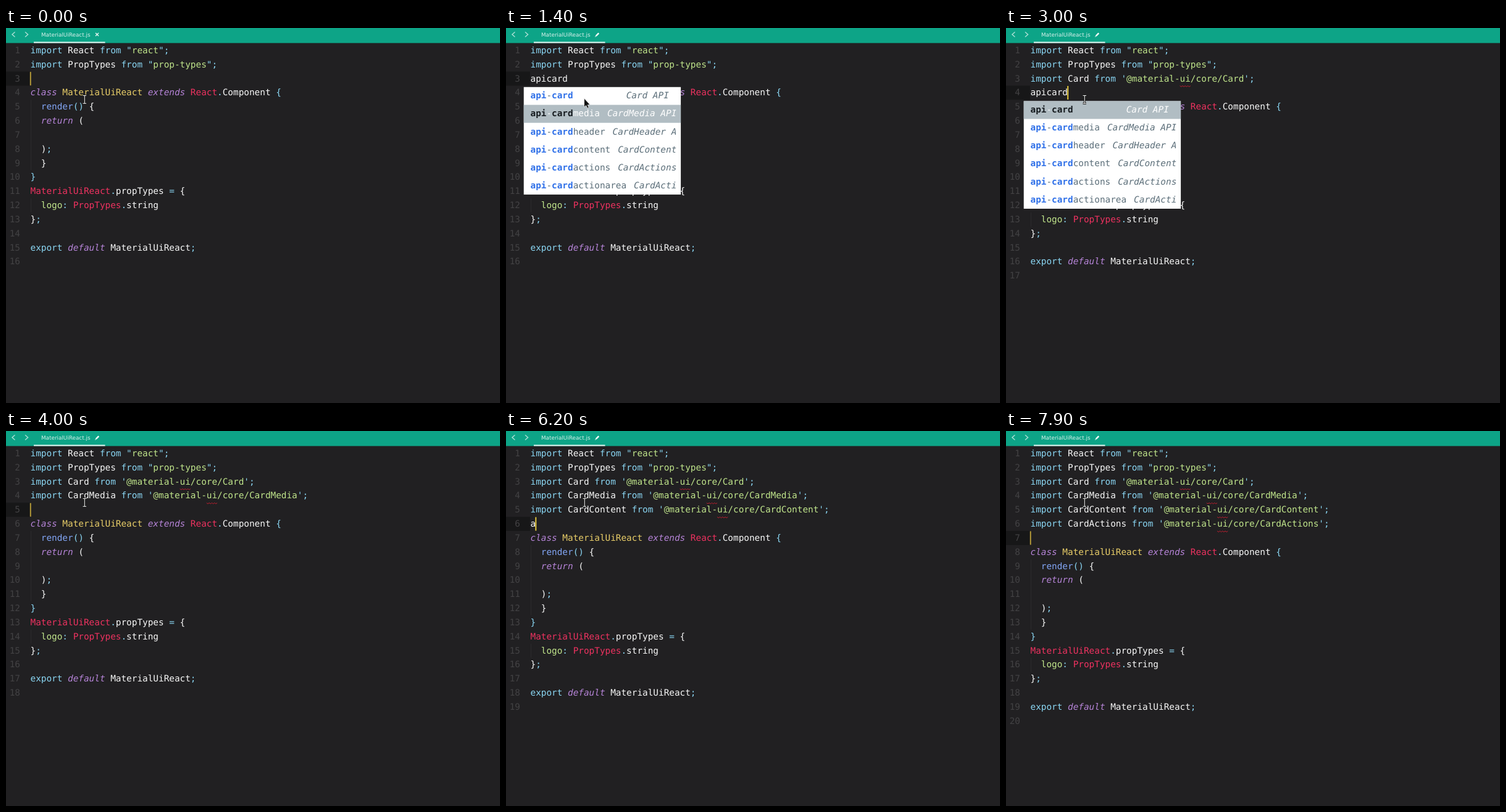
An HTML page with a canvas that plays this animation: 800x608 px, repeating every 8000 ms.

```html
<!DOCTYPE html>
<html lang="en">
<head>
<meta charset="utf-8">
<title>Editor autocomplete</title>
<style>
html, body { margin: 0; width: 100%; height: 100%; overflow: hidden; background: #212022; }
canvas { display: block; }
</style>
</head>
<body>
<canvas id="stage" width="800" height="608"></canvas>
<script>
const ctx = document.getElementById('stage').getContext('2d');
const LOOP = 8000, LEFT = 39.5, PITCH = 22.83, ROW = 29.12, SIZE = 14.37;
const MONO = `${SIZE}px "DejaVu Sans Mono", monospace`;
ctx.textRendering = 'geometricPrecision';
ctx.font = MONO;
const CHAR = ctx.measureText('m').width;

// Each segment starts with its style letter; segments are parted by |
const COLORS = { c: '#8ad6f3', w: '#f8f8f8', g: '#c0e58b', p: '#b684d8', y: '#e8cd68', r: '#ee3260', b: '#82a5f5' };
const HEAD = ['cimport |wReact |cfrom "|greact|c";', 'cimport |wPropTypes |cfrom "|gprop-types|c";'];
const TAIL = [
  'pclass |yMaterialUiReact |pextends |rReact|c.|wComponent |c{',
  'w  |brender|c() |w{', 'w  |preturn |w(', 'w', 'w  )|c;', 'w  }', 'c}',
  'rMaterialUiReact|c.|wpropTypes |c= |w{',
  'w  |glogo|c: |rPropTypes|c.|wstring', 'w}|c;', 'w',
  'cexport |pdefault |wMaterialUiReact|c;', 'w'
];
const importLine = name => `cimport |w${name} |cfrom '|g@material-ui/core/${name}|c';`;

// keys: times of the letters of QUERY; picks: [time, selected row, scroll in rows]
const QUERY = 'apicard';
const STEPS = [
  { name: 'Card', keys: [300, 400, 500, 600, 700, 800, 950], picks: [[1200, 1, 0], [1500, 0, 0]], insert: 1600, enter: 1800 },
  { name: 'CardMedia', keys: [2000, 2400, 2500, 2600, 2700, 2800, 2900], picks: [[2100, 20, 14.4], [2400, 0, 0], [3300, 1, 0]], insert: 3700, enter: 3900 },
  { name: 'CardContent', keys: [4100, 4200, 4300, 4400, 4500, 4700, 4800], picks: [[4500, 1, 1], [4700, 1, 0], [5000, 2, 0], [5200, 3, 0]], insert: 5500, enter: 5800 },
  { name: 'CardActions', keys: [6200, 6300, 6400, 6500, 6600, 6700, 6800], picks: [[6900, 1, 0], [7000, 2, 0], [7100, 4, 0]], insert: 7200, enter: 7700 }
];

const ITEMS = ('Card Chip Fade Grid Grow Icon Link List Menu Step Tabs Zoom Badge Modal Input Table Slide Radio ' +
  'Portal Switch Slider Select Avatar Collapse Container CardMedia CardHeader CardContent CardActions CssBaseline ' +
  'CardActionArea CircularProgress ClickAwayListener').split(' ');
const TOTALS = [0, 89, 89, 89, 45, 27];

// Positions of the query letters in the label, or null if they do not all occur
function match(label, query) {
  const hits = [];
  let from = 0;
  for (const ch of query) {
    const at = label.indexOf(ch, from);
    if (at < 0) return null;
    hits.push(at);
    from = at + 1;
  }
  return hits;
}

function suggestions(query) {
  const rest = query.slice(3);
  const rank = row => rest && row.label.startsWith('api-' + rest) ? 0 : 1;
  return ITEMS
    .map(name => ({ name, label: 'api-' + name.toLowerCase() }))
    .map(row => ({ ...row, hits: match(row.label, query) }))
    .filter(row => row.hits)
    .sort((a, b) => rank(a) - rank(b));
}

function text(str, x, y, color, style = '') {
  ctx.font = `${style} ${MONO}`;
  ctx.fillStyle = color;
  ctx.fillText(str, x, y);
}

function rect(x, y, w, h, color) {
  ctx.fillStyle = color;
  ctx.fillRect(x, y, w, h);
}

function path(points, color, width, close) {
  ctx.beginPath();
  points.forEach(([x, y]) => ctx.lineTo(x, y));
  if (close) ctx.closePath();
  ctx.strokeStyle = color;
  ctx.lineWidth = width;
  ctx.stroke();
}

const baseline = n => 41 + PITCH * (n - 1);
const plain = line => line.split('|').map(s => s.slice(1)).join('');

function drawHeader(modified) {
  rect(0, 0, 800, 24.4, '#0da487');
  path([[14.5, 6.5], [10, 10.5], [14.5, 14.5]], '#a9ded3', 1.5);
  path([[31, 6.5], [35.5, 10.5], [31, 14.5]], '#a9ded3', 1.5);
  ctx.font = '8.83px "DejaVu Sans", sans-serif';
  ctx.fillStyle = '#d8f1ec';
  ctx.fillText('MaterialUiReact.js', 57, 13.7);
  rect(45, 22.4, 115.5, 2, '#e6f5f2');
  if (modified) {
    path([[145.6, 13], [150.2, 8.4]], '#fff', 2.4);
    path([[144.4, 14.4], [145.4, 13.4]], '#fff', 1.2);
  } else {
    path([[145, 8], [150, 13]], '#e4f5f1', 1.4);
    path([[150, 8], [145, 13]], '#e4f5f1', 1.4);
  }
}

function drawLine(line, n, active) {
  const y = baseline(n);
  if (active) rect(0, y - 16, 39, PITCH, '#171718');
  ctx.textAlign = 'right';
  text(n, 23, y, '#434244');
  ctx.textAlign = 'left';
  let col = 0;
  for (const part of line.split('|')) {
    const str = part.slice(1);
    text(str, LEFT + col * CHAR, y, COLORS[part[0]], part[0] === 'p' ? 'italic' : '');
    col += str.length;
  }
  const ui = plain(line).indexOf('ui/');
  if (ui < 0) return;
  const wave = Array.from({ length: 9 }, (_, i) => [LEFT + ui * CHAR + i * 2.16, y + 7 + i % 2 * 1.6]);
  path(wave, '#c01f30', 1);
}

function drawPopup(query, top, sel, scroll) {
  const rows = suggestions(query), x = 28.5;
  const width = query.length < 5 ? 236 : 254.8;
  const shown = Math.min(8, rows.length), height = shown * ROW, right = x + width;
  ctx.save();
  ctx.beginPath();
  ctx.rect(x, top, width, height);
  ctx.clip();
  rect(x, top, width, height, '#fff');
  rows.forEach((row, i) => {
    const y = top + (i - scroll) * ROW, base = y + 18.8, on = i === sel;
    if (y < top - ROW || y > top + height) return;
    if (on) rect(x, y, width, ROW, '#b1bdc3');
    const dim = on ? '#fff' : '#5b6e79';
    [...row.label].forEach((ch, k) => {
      const hit = row.hits.includes(k);
      text(ch, LEFT + k * CHAR, base, hit ? (on ? '#161b1f' : '#2f70e8') : dim, hit ? 'bold' : '');
    });
    const detail = row.name + ' API';
    const start = Math.max(LEFT + row.label.length * CHAR + 12, right - 19.5 - detail.length * CHAR);
    ctx.save();
    ctx.beginPath();
    ctx.rect(x, top, width - 8, height);
    ctx.clip();
    text(detail, start, base, dim, 'italic');
    ctx.restore();
  });
  const total = TOTALS[query.length] || rows.length;
  if (total > 8) rect(right - 7.5, top + scroll / total * height, 6, 8 / total * height, '#98a4ae');
  ctx.restore();
}

function drawPointer(arrow) {
  if (arrow) {
    path([[127, 115], [127, 127.5], [129.8, 125], [132, 129.5], [133.6, 128.7], [131.6, 124.4], [135.2, 124]], '#ddd', 1.4, true);
    ctx.fillStyle = '#111';
    ctx.fill();
    return;
  }
  for (const [color, width] of [['#111', 3], ['#eee', 1.1]]) {
    path([[127.3, 110], [127.3, 122]], color, width);
    path([[124.5, 109.5], [130, 109.5]], color, width);
    path([[124.5, 122.3], [130, 122.3]], color, width);
  }
}

function draw(t) {
  const done = STEPS.filter(s => s.enter <= t);
  const step = STEPS[done.length];
  const inserted = step && t >= step.insert;
  const query = step && !inserted ? QUERY.slice(0, step.keys.filter(k => k <= t).length) : '';
  const current = inserted ? importLine(step.name) : 'w' + query;
  const active = 3 + done.length;
  const lines = [...HEAD, ...done.map(s => importLine(s.name)), current, ...TAIL];

  rect(0, 0, 800, 608, '#212022');
  rect(40, baseline(active + 2) - 16, 1, PITCH * 5, '#2b2a2c');
  rect(40, baseline(active + 9) - 16, 1, PITCH, '#2b2a2c');
  lines.forEach((line, i) => drawLine(line, i + 1, i + 1 === active));
  drawHeader(t >= STEPS[0].keys[0]);

  // The caret stays on for a while after each edit, then blinks
  const edits = STEPS.flatMap(s => [...s.keys, s.insert, s.enter]);
  const last = Math.max(0, ...edits.filter(e => e <= t));
  if (Math.floor((t - last) / 400) % 2 === 0) {
    const length = plain(current).length;
    rect(LEFT - 0.7 + length * CHAR, baseline(active) - 15.5, 1.8, 22, length ? '#f4d53f' : '#c2a63b');
  }

  const open = query && t >= step.keys[0] + 100;
  if (open) {
    const [, sel, scroll] = step.picks.filter(p => p[0] <= t).pop() || [0, 0, 0];
    drawPopup(query, 27 + PITCH * active, sel, scroll);
  }
  drawPointer(open && !done.length && t >= 1000);
}

const begin = performance.now();
function tick() {
  draw((performance.now() - begin) % LOOP);
  requestAnimationFrame(tick);
}
tick();
</script>
</body>
</html>
```
